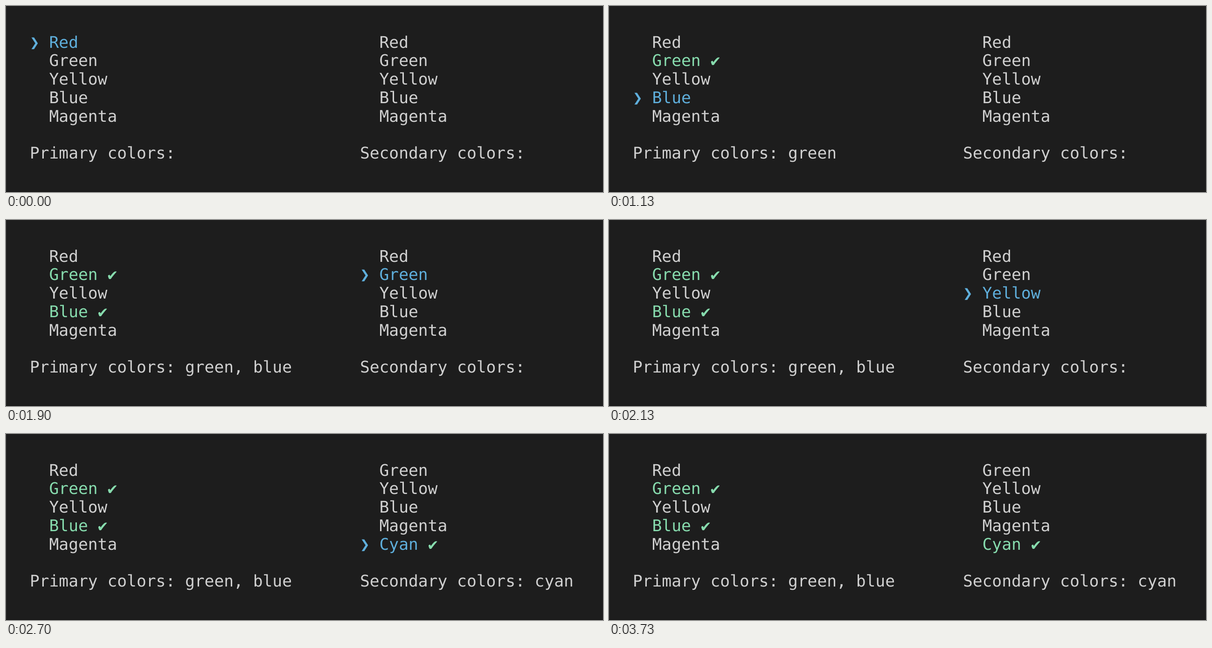
An HTML page for the animation above (4.02 s loop, 1280 by 400 pixels).

```html
<!DOCTYPE html>
<html lang="en">
<head>
<meta charset="utf-8">
<title>Color menus</title>
<style>
  html, body { margin: 0; width: 100%; height: 100%; overflow: hidden; background: #1d1d1d; }
  svg { display: block; width: 1280px; height: 400px; }
  text {
    font: 34.59px "DejaVu Sans Mono", Menlo, monospace;
    font-variant-ligatures: none;
    text-rendering: geometricPrecision;
    white-space: pre;
    fill: #d0d0d0;
  }
  .active { fill: #5fafdc; }
  .picked { fill: #87dcae; }
</style>
</head>
<body>
<svg id="stage" viewBox="0 0 1280 400">
  <rect width="1280" height="400" fill="#1d1d1d"/>
  <rect width="1" height="400" fill="#292929"/>
  <rect y="398" width="1280" height="2" fill="#171717"/>
</svg>
<script>
const LOOP = 4020, ROWS = 5, TOP = 89.5, PITCH = 39.8;
const COLORS = ["Red", "Green", "Yellow", "Blue", "Magenta", "Cyan"];
const stage = document.getElementById("stage");

// Key presses: "down", "pick" or "tab" at a time in ms
const KEYS = [
  [230, "down"], [730, "pick"], [970, "down"], [1130, "down"], [1470, "pick"],
  [1730, "tab"], [1900, "down"], [2070, "down"], [2230, "down"], [2400, "down"],
  [2530, "down"], [2700, "pick"], [3000, "tab"]
];

function addText(x, row) {
  const el = document.createElementNS(stage.namespaceURI, "text");
  el.setAttribute("x", x);
  el.setAttribute("y", TOP + row * PITCH);
  stage.append(el);
  return el;
}

function span(content, cls) {
  const el = document.createElementNS(stage.namespaceURI, "tspan");
  el.textContent = content;
  if (cls) el.setAttribute("class", cls);
  return el;
}

const menus = [[50.9, "Primary"], [758.9, "Secondary"]].map(([x, name]) => ({
  name,
  lines: Array.from({ length: ROWS }, (_, row) => addText(x, row)),
  summary: addText(x, ROWS + 1)
}));

// Replays the first `count` key presses
function stateAfter(count) {
  const lists = menus.map(() => ({ cursor: 0, picks: [] }));
  let focus = 0;
  for (const [, key] of KEYS.slice(0, count)) {
    const list = lists[focus];
    if (key === "down") list.cursor++;
    else if (key === "pick") list.picks.push(list.cursor);
    else focus++;
  }
  return { lists, focus };
}

function draw(count) {
  const { lists, focus } = stateAfter(count);
  menus.forEach((menu, m) => {
    const { cursor, picks } = lists[m];
    const first = Math.max(0, cursor - ROWS + 1);
    menu.lines.forEach((line, row) => {
      const i = first + row;
      const active = m === focus && i === cursor;
      const picked = picks.includes(i);
      const cls = active ? "active" : picked ? "picked" : "";
      line.replaceChildren(span((active ? "❯ " : "  ") + COLORS[i], cls));
      if (picked) line.append(span(" ✔", "picked"));
    });
    const chosen = picks.map(i => COLORS[i].toLowerCase()).join(", ");
    menu.summary.textContent = `${menu.name} colors: ${chosen}`;
  });
}

const start = performance.now();
let shown = -1;

function tick() {
  const t = (performance.now() - start) % LOOP;
  const count = KEYS.filter(([at]) => at <= t).length;
  if (count !== shown) draw(shown = count);
  requestAnimationFrame(tick);
}
tick();
</script>
</body>
</html>
```
